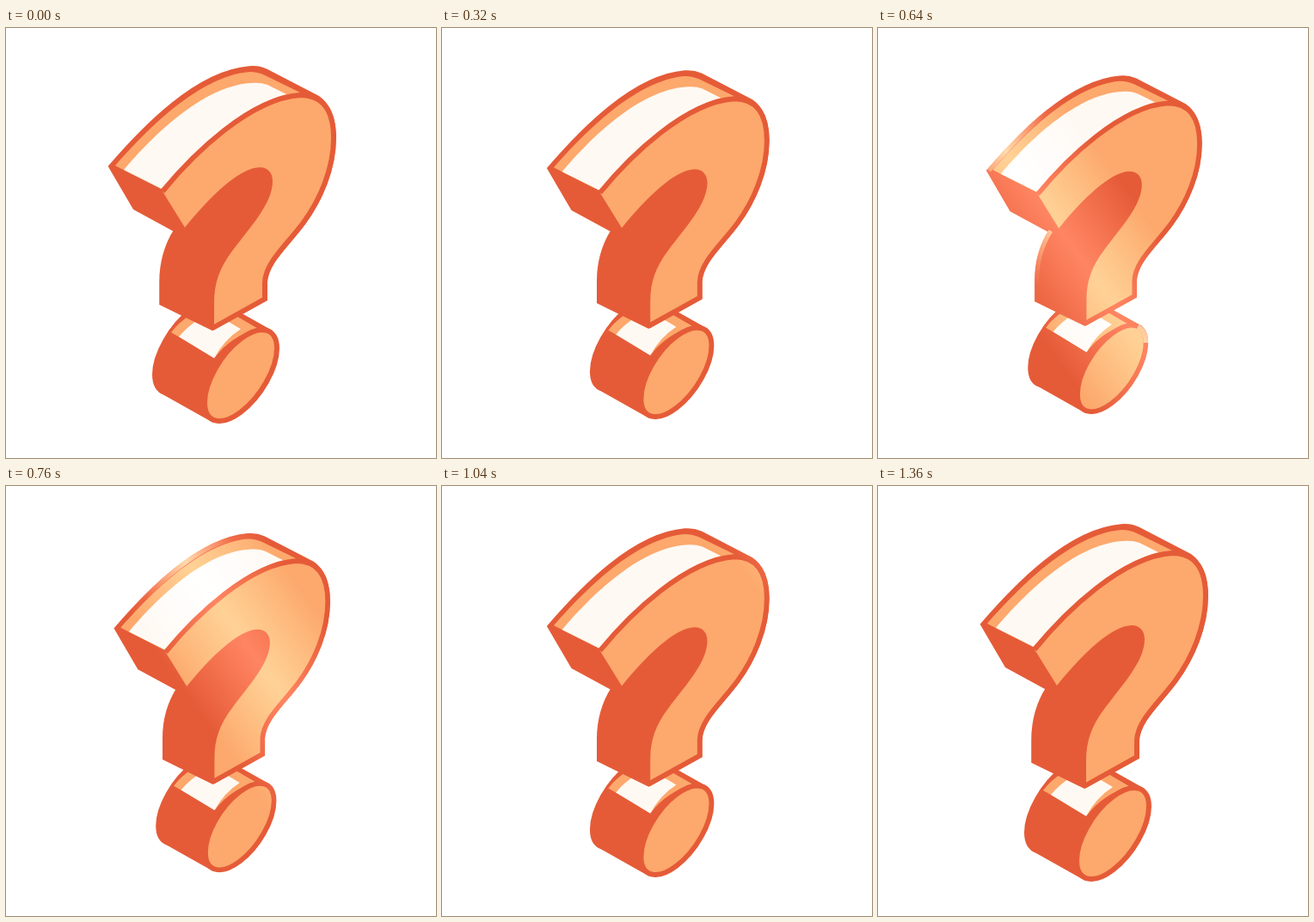
Write an HTML page with a canvas that moves like this. It is 500 px wide and 500 px high and loops after 2 s.

```html
<!DOCTYPE html>
<html lang="en">
<head>
<meta charset="utf-8">
<title>Question mark</title>
<style>
  html, body { margin: 0; width: 100%; height: 100%; overflow: hidden; background: #fff; }
  canvas { display: block; width: 500px; height: 500px; }
</style>
</head>
<body>
<canvas id="stage" width="500" height="500"></canvas>
<script>
const ctx = document.getElementById('stage').getContext('2d');

const LOOP = 2000, STEP = 40, PULSE = 1360, SHRINK = 0.054;
const RED = '#e55b38', ORANGE = '#fda86c', CREAM = '#fff9f3';

// Mark
const backCurve = 'M122 161 C160 117 222 52 283 47 Q293 46 302 50 ';
const hook = 'L181 320 L181 295 Q181 262 198 235 ';
const rightSide = 'C381 164 365 200 346 226 C327 252 302 272 301 296 L301 315 L240 349 ';
const edge = 'M182 190 C218 146 284 82 342 78 C370 78 381 98 381 128 ' + rightSide;

const body = new Path2D(backCurve + 'L362 81 C375 90 381 105 381 128 ' + rightSide + hook + 'L150 209 Z');
const topSide = new Path2D('M127 160 C163 119 224 56 283 51 Q293 51 301 55 L342 75 L342 78 C284 82 218 146 182 188 Z');
const topLight = new Path2D('M137 165 C170 126 228 68 284 64 Q296 63 304 66 L326 77 C276 90 218 146 181 187 Z');
const faceEdge = new Path2D(edge);
const face = new Path2D(edge + 'L242 347 L242 320 C242 297 248 279 264 258 ' +
  'C284 231 310 204 310 178 C310 168 304 162 295 162 C272 162 237 196 208 232 Z');

// Dot
const disc = (x, y, from = 0, to = Math.PI * 2) => {
  const arc = new Path2D(), path = new Path2D();
  arc.arc(0, 0, 1, from, to);
  path.addPath(arc, new DOMMatrix([42, -31.5, 0, 42.6, x, y]));
  return path;
};
const dotFront = disc(273, 404);
const dotBack = disc(215, 371.5);
const dotSide = new Path2D('M306 353 L248 320.5 L182 422.5 L240 455 Z');
const dotTop = new Path2D('M192 354 Q201 342 214 334 L268 335 L292 349 Q260 360 243 383 Z');
const dotLight = new Path2D('M201 359 Q211 347 224 339 L256 340 L273 350 Q254 362 242 384 Z');

// Outer edges that catch the light
const rims = [
  new Path2D(backCurve + 'L325 62'),
  new Path2D(hook.replace('L', 'M')),
  disc(215, 371.5, Math.PI - 0.8, Math.PI + 0.9),
  disc(273, 404, -0.7, 0)
];

function paint(path, fill, line, width) {
  if (fill) { ctx.fillStyle = fill; ctx.fill(path); }
  if (line) { ctx.strokeStyle = line; ctx.lineWidth = width; ctx.stroke(path); }
}

// Diagonal band centred at distance d along its normal
function band(d, half, rgb, alpha) {
  const nx = 0.816, ny = -0.577, a = d - half, b = d + half;
  const g = ctx.createLinearGradient(nx * a, ny * a, nx * b, ny * b);
  g.addColorStop(0, `rgba(${rgb},0)`);
  g.addColorStop(0.5, `rgba(${rgb},${alpha})`);
  g.addColorStop(1, `rgba(${rgb},0)`);
  return g;
}

function brighten(mode, d, rgb) {
  ctx.globalCompositeOperation = mode;
  ctx.fillStyle = band(d, 90, rgb, 1);
  ctx.fillRect(0, 0, 500, 500);
}

function draw(t) {
  const scale = 1 - SHRINK * (1 - Math.cos(2 * Math.PI * t / PULSE)) / 2;
  const shine = 38 + 0.7 * (t - 640);

  ctx.setTransform(1, 0, 0, 1, 0, 0);
  ctx.fillStyle = '#fff';
  ctx.fillRect(0, 0, 500, 500);

  ctx.setTransform(scale, 0, 0, scale, 250 * (1 - scale), 252 * (1 - scale));
  paint(dotBack, RED, RED, 6);
  paint(dotSide, RED, RED, 6);
  paint(dotTop, ORANGE);
  paint(dotLight, CREAM);
  paint(dotFront, ORANGE, RED, 6);
  paint(body, RED, RED, 5.5);
  paint(topSide, ORANGE);
  paint(topLight, CREAM);
  paint(face, ORANGE);
  paint(faceEdge, null, RED, 6);

  const rimLight = band(shine, 65, '255,200,150', 0.8);
  for (const rim of rims) paint(rim, null, rimLight, 5.5);

  ctx.setTransform(1, 0, 0, 1, 0, 0);
  brighten('color-dodge', shine, '41,41,41');
  brighten('screen', shine, '43,43,43');
  ctx.globalCompositeOperation = 'source-over';
}

const start = performance.now();
function tick(now) {
  const t = Math.max(0, now - start) % LOOP;
  draw(Math.min(Math.floor(t / STEP) * STEP, PULSE));
  requestAnimationFrame(tick);
}
draw(0);
requestAnimationFrame(tick);
</script>
</body>
</html>
```
